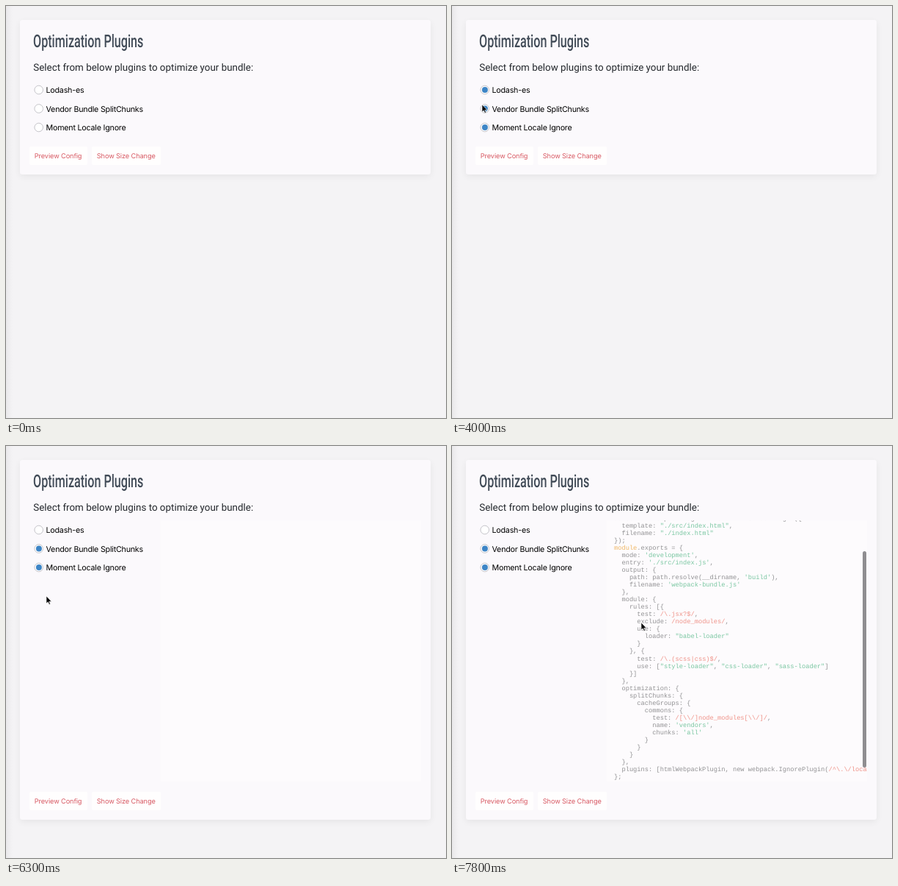
An HTML page that plays this animation: 600 px wide and 560 px high, repeating every 8000 ms.

```html
<!DOCTYPE html>
<html lang="en">
<head>
<meta charset="utf-8">
<title>Optimization Plugins</title>
<style>
html, body { margin: 0; width: 100%; height: 100%; overflow: hidden; background: #f4f3f5; }
body { position: relative; text-rendering: geometricPrecision; }
body > * { position: absolute; }
svg { left: 0; top: 0; }

.edge { left: 0; top: 0; width: 9px; height: 100%; background: linear-gradient(90deg, #e9e8ea, #f4f3f5); }
.card { left: 19px; top: 19px; width: 560px; height: 210px; border-radius: 3px;
  background: #fbf9fc; box-shadow: 0 3px 10px rgba(0, 0, 0, .06); animation: grow 8s step-end infinite; }
.panel { left: 211px; top: 101px; width: 355px; height: 355px; overflow: hidden;
  background: #fdfbfd; animation: open 8s step-end infinite; }
.code { position: absolute; left: 10px; top: 10.5px; margin: 0; color: #929294;
  font: 8.71px/10.04px "Liberation Mono", monospace; animation: code 8s step-end infinite; }
.key { color: #efb662; }
.str { color: #78c6a0; }
.rex { color: #ef9288; }
.thumb { position: absolute; left: 349px; top: 42px; width: 5px; height: 294px; border-radius: 3px;
  background: #8f8e91; animation: thumb 8s step-end infinite; }

.title { font: 500 24px Roboto, sans-serif; fill: #414b57; }
.lead { font: 13.4px Roboto, sans-serif; fill: #24282d; }
.label { font: 10.7px Inter, sans-serif; letter-spacing: -.21px; fill: #000; }
.ring { fill: #fff; stroke: #c4c4c9; }
.dot { fill: #3d85c6; }
.d1 { animation: d1 8s step-end infinite; }
.d2 { animation: d2 8s step-end infinite; }
.d3 { animation: d3 8s step-end infinite; }
.buttons { font: 9.2px Inter, sans-serif; letter-spacing: -.1px; fill: #d85a64; animation: drop 8s step-end infinite; }
.buttons rect { fill: #fffefe; }
.buttons .hover { animation: hover 8s step-end infinite; }
.cursor { animation: move 8s step-end infinite; }

@keyframes grow { 72.5%, 100% { height: 489px; } }
@keyframes open { 0% { visibility: hidden; } 72.5%, 100% { visibility: visible; } }
@keyframes drop { 72.5%, 100% { transform: translateY(279px); } }
@keyframes hover { 68.75% { fill: #f6eef1; } 72.5% { fill: #fffefe; } }
@keyframes d1 { 0% { opacity: 0; } 22.5% { opacity: 1; } 60%, 100% { opacity: 0; } }
@keyframes d2 { 0% { opacity: 0; } 35%, 100% { opacity: 1; } }
@keyframes d3 { 0% { opacity: 0; } 43.75%, 100% { opacity: 1; } }
@keyframes code {
  0% { opacity: 0; }
  81.25% { opacity: 1; transform: none; }
  97.5%, 100% { opacity: 1; transform: translateY(-48.3px); }
}
@keyframes thumb { 0% { opacity: 0; } 97.5%, 100% { opacity: 1; } }
@keyframes move {
  0% { transform: translate(-30px, -30px); }
  3.75% { transform: translate(193px, 194px); }
  6.25% { transform: translate(58px, 112px); }
  10% { transform: translate(46px, 112px); }
  12.5% { transform: translate(40px, 112px); }
  16.25% { transform: translate(41px, 113px); }
  18.75% { transform: translate(41px, 114px); }
  25% { transform: translate(41px, 118px); }
  28.75% { transform: translate(41px, 138px); }
  37.5% { transform: translate(43px, 152px); }
  41.25% { transform: translate(42px, 165px); }
  47.5% { transform: translate(42px, 154px); }
  50% { transform: translate(41px, 134px); }
  53.75% { transform: translate(41px, 113px); }
  62.5% { transform: translate(51px, 136px); }
  66.25% { transform: translate(55.5px, 185.5px); }
  68.75% { transform: translate(55px, 204px); }
  85% { transform: translate(150px, 230px); }
  87.5% { transform: translate(256px, 241px); }
  91.25%, 100% { transform: translate(258px, 240px); }
}
</style>
</head>
<body>
<div class="edge"></div>
<div class="card"></div>
<svg width="600" height="560">
  <text class="title" transform="translate(37 56) scale(.672 1)">Optimization Plugins</text>
  <text class="lead" x="37.3" y="88">Select from below plugins to optimize your bundle:</text>
  <g class="ring">
    <circle cx="44.7" cy="114" r="5.8"/>
    <circle cx="44.7" cy="139.5" r="5.8"/>
    <circle cx="44.7" cy="165" r="5.8"/>
  </g>
  <g class="dot">
    <circle class="d1" cx="44.9" cy="114" r="4"/>
    <circle class="d2" cx="44.9" cy="139.5" r="4"/>
    <circle class="d3" cx="44.9" cy="165" r="4"/>
  </g>
  <g class="label">
    <text x="54.5" y="118">Lodash-es</text>
    <text x="54.5" y="143.6">Vendor Bundle SplitChunks</text>
    <text x="54.5" y="168.8">Moment Locale Ignore</text>
  </g>
  <g class="buttons">
    <rect class="hover" x="32" y="191" width="79" height="25" rx="2"/>
    <rect x="117" y="191" width="94" height="25" rx="2"/>
    <text x="38.8" y="206.7">Preview Config</text>
    <text x="123.8" y="206.7">Show Size Change</text>
  </g>
</svg>
<div class="panel">
<pre class="code">const webpack = require('webpack');
const HtmlWebPackPlugin = require("html-webpack-plugin");
const path = require('path');
const htmlWebpackPlugin = new HtmlWebPackPlugin({
  template: "./src/index.html",
  filename: "./index.html"
});
module.exports = {
  mode: 'development',
  entry: './src/index.js',
  output: {
    path: path.resolve(__dirname, 'build'),
    filename: 'webpack-bundle.js'
  },
  module: {
    rules: [{
      test: /\.jsx?$/,
      exclude: /node_modules/,
      use: {
        loader: "babel-loader"
      }
    }, {
      test: /\.(scss|css)$/,
      use: ["style-loader", "css-loader", "sass-loader"]
    }]
  },
  optimization: {
    splitChunks: {
      cacheGroups: {
        commons: {
          test: /[\\/]node_modules[\\/]/,
          name: 'vendors',
          chunks: 'all'
        }
      }
    }
  },
  plugins: [htmlWebpackPlugin, new webpack.IgnorePlugin(/^\.\/locale$/, /moment$/)]
};</pre>
<div class="thumb"></div>
</div>
<svg width="600" height="560">
  <path class="cursor" d="M0 0V10L2.3 7.9 3.9 11.5 5.4 10.8 3.9 7.4H7Z" fill="#000" stroke="#fff" stroke-width=".6"/>
</svg>
<script>
// Colour keywords, strings and regular expressions in the listing.
const code = document.querySelector('.code');
const token = /(require|module(?=\.))|("[^"]*"|'[^']*')|\/\S+\/(?=[,)])/g;
code.innerHTML = code.textContent.replace(token, (text, key, str) =>
  `<span class="${key ? 'key' : str ? 'str' : 'rex'}">${text}</span>`);
</script>
</body>
</html>
```
